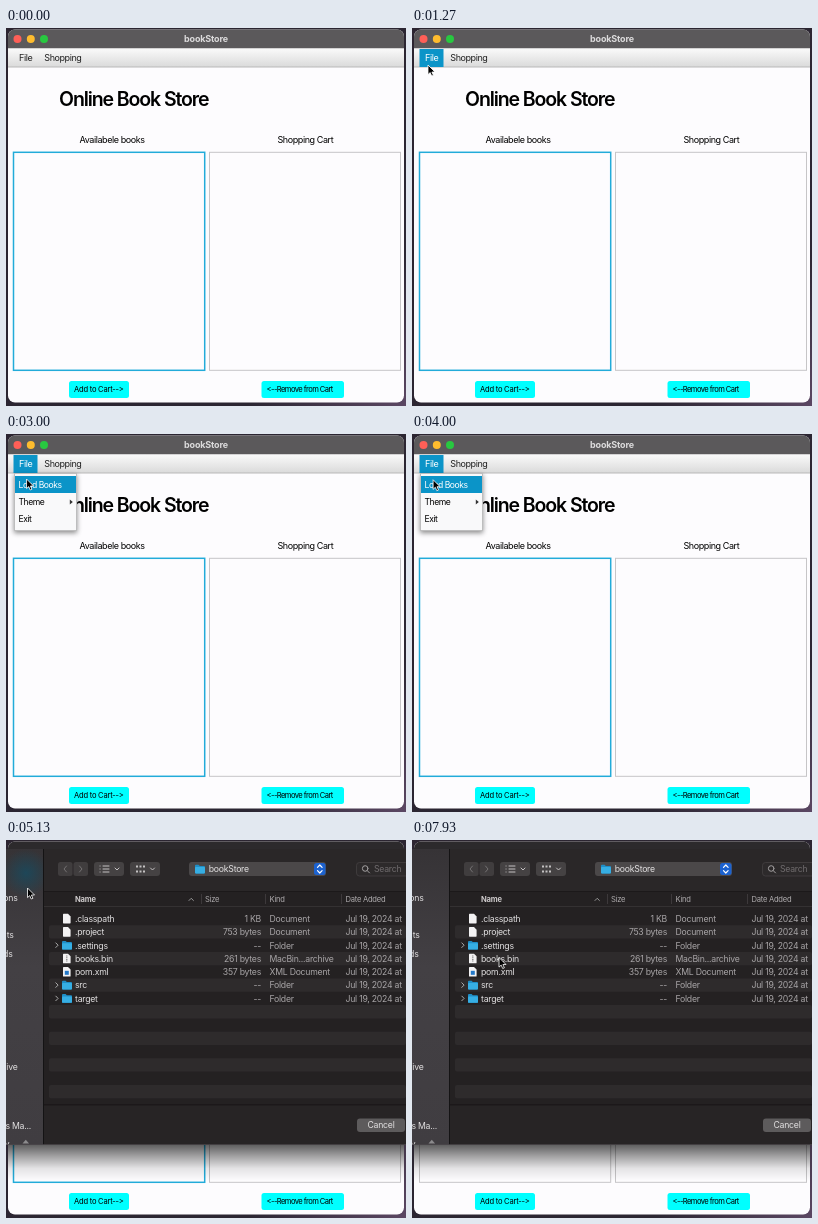
Animation, 400 px wide and 378 px high, one loop 8 s. Source, as an HTML page:

```html
<!DOCTYPE html>
<html lang="en">
<head>
<meta charset="utf-8">
<title>bookStore</title>
<style>
  html, body { margin: 0; width: 100%; height: 100%; overflow: hidden; background: #2b2430; }
  svg { display: block; width: 400px; height: 378px; }
  text { font: 9px Inter, "Open Sans", sans-serif; font-feature-settings: "calt" 0; letter-spacing: -.42px; white-space: pre; }
  .title { font-size: 9px; font-weight: 700; letter-spacing: -.15px; }
  .head { font-size: 19.5px; font-weight: 600; letter-spacing: -1.1px; }
  .btn { font-size: 7.6px; letter-spacing: -.24px; }
  .tight { letter-spacing: -.57px; }
  .item { font-size: 8.6px; letter-spacing: -.48px; }
  #sheet text { font-size: 8.7px; letter-spacing: -.25px; fill: #a8a5a7; }
  #sheet .col { font-size: 7.6px; fill: #aeabad; }
  #sheet .bold { font-weight: 700; fill: #cfcccd; }
  #sheet .lit { fill: #e2e0e1; }
  #sheet .dim { fill: #706c6e; }
  .end { text-anchor: end; }
  .mid { text-anchor: middle; }
  .line { fill: none; stroke-linecap: round; stroke-linejoin: round; }
</style>
</head>
<body>
<svg viewBox="0 0 400 378" xmlns="http://www.w3.org/2000/svg">
  <defs>
    <linearGradient id="bar" x2="0" y2="1">
      <stop stop-color="#fafafa"/><stop offset="1" stop-color="#dadada"/>
    </linearGradient>
    <linearGradient id="desk" x2="1" y2="1">
      <stop stop-color="#2c2531"/><stop offset=".8" stop-color="#2b2632"/><stop offset="1" stop-color="#5b4763"/>
    </linearGradient>
    <linearGradient id="drop" x2="0" y2="1">
      <stop stop-color="#000" stop-opacity=".62"/>
      <stop offset=".3" stop-color="#000" stop-opacity=".37"/>
      <stop offset=".65" stop-color="#000" stop-opacity=".1"/>
      <stop offset="1" stop-color="#000" stop-opacity="0"/>
    </linearGradient>
    <linearGradient id="sidebar" x2="0" y2="1">
      <stop stop-color="#363336"/><stop offset=".4" stop-color="#434044"/><stop offset="1" stop-color="#403d41"/>
    </linearGradient>
    <radialGradient id="tint">
      <stop stop-color="#174b60" stop-opacity=".8"/><stop offset="1" stop-color="#174b60" stop-opacity="0"/>
    </radialGradient>
    <filter id="shadow" x="-20%" y="-20%" width="140%" height="150%">
      <feDropShadow dx="0" dy="2" stdDeviation="2.5" flood-opacity=".45"/>
    </filter>
    <clipPath id="frame"><rect x="2" y="1.5" width="396" height="373" rx="7"/></clipPath>
    <clipPath id="panel"><rect y="9" width="400" height="296"/></clipPath>
    <g id="folder">
      <path d="M0 1.2q0-1 1-1h2.6l1.2 1.2H9q1 0 1 1V8q0 .9-1 .9H1Q0 8.900 0 8z" fill="#1f8ec6"/>
      <rect y="2.5" width="10" height="6.400" rx=".8" fill="#36aee3"/>
    </g>
    <path id="doc" d="M0 .6Q0 0 .6 0H5l2.600 2.600V9q0 .6-.6.6H.6Q0 9.600 0 9z" fill="#f3f2f3"/>
  </defs>

  <rect width="400" height="378" fill="url(#desk)"/>
  <g clip-path="url(#frame)">
    <rect width="400" height="378" fill="#fdfcfe"/>
    <rect id="caption" width="400" height="20.500" fill="#5b595b"/>
    <g id="lights">
      <circle cx="11.500" cy="11" r="4" fill="#ff5f57"/>
      <circle cx="24.800" cy="11" r="4" fill="#febc2e"/>
      <circle cx="38" cy="11" r="4" fill="#28c840"/>
      <text class="title mid" x="200" y="14.200" fill="#dcdbdc">bookStore</text>
    </g>
    <rect y="20.500" width="400" height="18.500" fill="url(#bar)"/>
    <rect y="38.500" width="400" height="1" fill="#b9b9b9"/>
    <rect id="hover" x="7.500" y="21" width="24" height="18" fill="#0b94c8"/>
    <text id="file" x="13" y="33.300">File</text>
    <text x="38.300" y="33.300" fill="#222">Shopping</text>
    <text class="head" x="53" y="78">Online Book Store</text>
    <text x="73.500" y="114.500">Availabele books</text>
    <text x="271.500" y="114.500">Shopping Cart</text>
    <rect id="books" x="7.500" y="124.300" width="191.200" height="218" fill="none"/>
    <rect x="203.500" y="124.300" width="191" height="218" fill="none" stroke="#c6c5c7"/>
    <g fill="#00ffff">
      <rect x="63" y="353" width="60" height="17" rx="2.500"/>
      <rect x="255.500" y="353" width="82.500" height="17" rx="2.500"/>
    </g>
    <text class="btn" x="68" y="364">Add to Cart--&gt;</text>
    <text class="btn tight" x="260.500" y="364">&lt;--Remove from Cart</text>
    <rect id="shade" y="305" width="400" height="36" fill="url(#drop)"/>
  </g>

  <g id="menu">
    <rect x="8.500" y="39.500" width="62" height="57" fill="#f9f9fa" stroke="#bdbdbe" filter="url(#shadow)"/>
    <rect id="pick" x="9" y="42" width="61" height="17" fill="#0b94c8"/>
    <text id="load" class="item" x="12.500" y="53.800">Load Books</text>
    <text class="item" x="12.500" y="71">Theme</text>
    <text class="item" x="12.500" y="88.200">Exit</text>
    <path d="M63.800 65.500v5l3-2.500z" fill="#333"/>
  </g>

  <g id="sheet" clip-path="url(#panel)">
    <rect y="9" width="400" height="296" fill="#242122"/>
    <rect y="9" width="37.500" height="296" fill="url(#sidebar)"/>
    <ellipse id="glow" cx="20" cy="33" rx="24" ry="24" fill="url(#tint)"/>
    <rect x="37" y="9" width="1" height="296" fill="#141314"/>
    <rect x="38" y="9" width="362" height="42.500" fill="#2a2728"/>
    <rect x="38" y="51" width="362" height=".8" fill="#1a1718"/>

    <g fill="#403d3e">
      <rect x="52" y="22" width="14.500" height="14" rx="2.500"/>
      <rect x="67.500" y="22" width="14.500" height="14" rx="2.500"/>
    </g>
    <path class="line" d="M60.500 26l-2.500 3 2.500 3M73.500 26l2.500 3-2.500 3" stroke="#747172"/>
    <g fill="#454243">
      <rect x="88" y="22" width="30" height="14" rx="3"/>
      <rect x="124" y="22" width="30" height="14" rx="3"/>
      <rect x="183" y="22" width="137" height="14" rx="3" fill="#4b4849"/>
    </g>
    <path class="line" d="M94 26h.1M97 26h6M94 29h.1M97 29h6M94 32h.1M97 32h6M109 28l2 2 2-2M144.500 28l2 2 2-2" stroke="#c4c1c2"/>
    <path d="M130 25.500h2v2h-2zm3.500 0h2v2h-2zm3.500 0h2v2h-2zM130 30.500h2v2h-2zm3.500 0h2v2h-2zm3.500 0h2v2h-2z" fill="#c4c1c2"/>
    <use href="#folder" x="189" y="24.500"/>
    <text class="lit" x="202.800" y="32.200">bookStore</text>
    <rect x="308" y="23" width="11.500" height="12" rx="2.500" fill="#1c62cf"/>
    <path class="line" d="M311.500 27.300l2.300-2.300 2.300 2.300M311.500 30.700l2.300 2.300 2.300-2.300" stroke="#fff" stroke-width="1.200"/>
    <rect x="350.500" y="22.500" width="60" height="13.500" rx="3" fill="#2d2a2b" stroke="#444142" stroke-width=".8"/>
    <path class="line" d="M362 28.500a2.800 2.800 0 1 1-5.600 0a2.800 2.800 0 1 1 5.600 0M361.300 30.700l2.200 2.200" stroke="#a5a2a3"/>
    <text class="dim" x="368" y="32.200">Search</text>

    <text class="col bold" x="69" y="61.700">Name</text>
    <path class="line" d="M183 60.500l2.200-2.200 2.200 2.200" stroke="#999"/>
    <text class="col" x="199" y="61.700">Size</text>
    <text class="col" x="263.500" y="61.700">Kind</text>
    <text class="col" x="339.500" y="61.700">Date Added</text>
    <path d="M195.500 54v10M259.500 54v10M335.500 54v10" stroke="#444142" stroke-width=".8"/>
    <rect x="38" y="66.300" width="362" height=".7" fill="#3c393a"/>
    <g id="rows"></g>
    <rect x="38" y="265" width="362" height="40" fill="#272425"/>
    <rect x="38" y="264.500" width="362" height=".8" fill="#141112"/>
    <rect x="351" y="278.500" width="48" height="13.500" rx="3" fill="#5d5b5c"/>
    <text class="lit mid" x="375" y="288.300">Cancel</text>

    <g id="side"></g>
    <path d="M16.500 303.500l3.300-3.800 3.300 3.800z" fill="#8c8b8d"/>
    <rect y="304.200" width="400" height=".8" fill="#4a474a"/>
  </g>

  <path id="cursor" d="M0 0V9.600L2.200 7.600 3.700 11 5.400 10.300 3.900 7H7z" fill="#000" stroke="#fff" stroke-width=".8"/>
</svg>
<script>
const LOOP = 8000, HOVER = 1200, OPEN = 2400, PICK = 2530, SHEET = 5130, BLUR = 5270;
const $ = id => document.getElementById(id);
const show = (id, on) => $(id).style.display = on ? '' : 'none';
const label = (x, y, s, cls = '') => `<text x="${x}" y="${y}" class="${cls}">${s}</text>`;

const files = [
  ['.classpath', '1 KB', 'Document'],
  ['.project', '753 bytes', 'Document'],
  ['.settings', '--', 'Folder'],
  ['books.bin', '261 bytes', 'MacBin...archive'],
  ['pom.xml', '357 bytes', 'XML Document'],
  ['src', '--', 'Folder'],
  ['target', '--', 'Folder']
];
const marks = {
  'books.bin': (x, y) => `<path d="M${x} ${y}v6" stroke="#777" stroke-width="1.2" stroke-dasharray="1 .7"/>`,
  'pom.xml': (x, y) => `<rect x="${x - 2}" y="${y + 2}" width="4" height="4" fill="#2378c8"/>`
};

function icon(name, kind, y) {
  if (kind === 'Folder')
    return `<path class="line" d="M49.800 ${y - 2.300}l2.300 2.300-2.300 2.300" stroke="#aaa"/><use href="#folder" x="56" y="${y - 4.5}"/>`;
  const mark = marks[name];
  return `<use href="#doc" x="57" y="${y - 4.8}"/>` + (mark ? mark(60.8, y - 3) : '');
}

let rows = '';
for (let i = 0; i < 15; i++) {
  const top = 72 + i * 13.3, y = top + 6.6, file = files[i];
  if (i % 2) rows += `<rect x="43" y="${top}" width="357" height="13.3" rx="2" fill="#2e2b2c"/>`;
  if (!file) continue;
  const [name, size, kind] = file, base = y + 3.3;
  rows += icon(name, kind, y) + label(69, base, name, 'lit') + label(255, base, size, 'end')
    + label(263.5, base, kind) + label(339.5, base, 'Jul 19, 2024 at');
}
$('rows').innerHTML = rows;
$('side').innerHTML = [[11.5, 61, 'ons'], [7.5, 98.3, 'ts'], [6.5, 116.7, 'ds'], [11.5, 230.3, 'ive'], [25, 288.8, 's Ma...'], [3.5, 307, 'y']]
  .map(([x, y, s]) => label(x, y, s, 'lit end')).join('');

// time, x, y of the pointer tip
const path = [
  [670, 130, 378], [1200, 16, 37], [1530, 16, 37], [2330, 17, 35], [2530, 19, 43], [2870, 20.5, 45],
  [3670, 21, 45], [4700, 21.5, 48], [5270, 21.5, 48], [5800, 84, 118], [6200, 86, 120], [7000, 87, 117.5], [LOOP, 87, 117.5]
];

function pointer(t) {
  const i = path.findIndex(p => p[0] > t);
  const [t0, x0, y0] = path[i - 1], [t1, x1, y1] = path[i];
  const k = (t - t0) / (t1 - t0), e = k * k * (3 - 2 * k);
  return [x0 + (x1 - x0) * e, y0 + (y1 - y0) * e];
}

function draw(t) {
  const sheet = t >= SHEET, blurred = t >= BLUR, picked = t >= PICK;
  show('hover', t >= HOVER && !sheet);
  $('file').setAttribute('fill', t >= HOVER && !sheet ? '#fff' : '#222');
  show('menu', t >= OPEN && !sheet);
  show('pick', picked);
  $('load').setAttribute('fill', picked ? '#fff' : '#222');
  show('sheet', sheet);
  show('shade', sheet);
  show('glow', !blurred);
  show('lights', !sheet);
  $('caption').setAttribute('fill', sheet ? '#2c2a2c' : '#5b595b');
  $('books').setAttribute('stroke', blurred ? '#c6c5c7' : '#22abd9');
  $('books').setAttribute('stroke-width', blurred ? 1 : 1.5);
  const moving = t >= path[0][0];
  show('cursor', moving);
  if (moving) $('cursor').setAttribute('transform', `translate(${pointer(t)})`);
}

const start = performance.now();
function tick(now) {
  draw(Math.max(0, now - start) % LOOP);
  requestAnimationFrame(tick);
}
draw(0);
requestAnimationFrame(tick);
</script>
</body>
</html>
```
